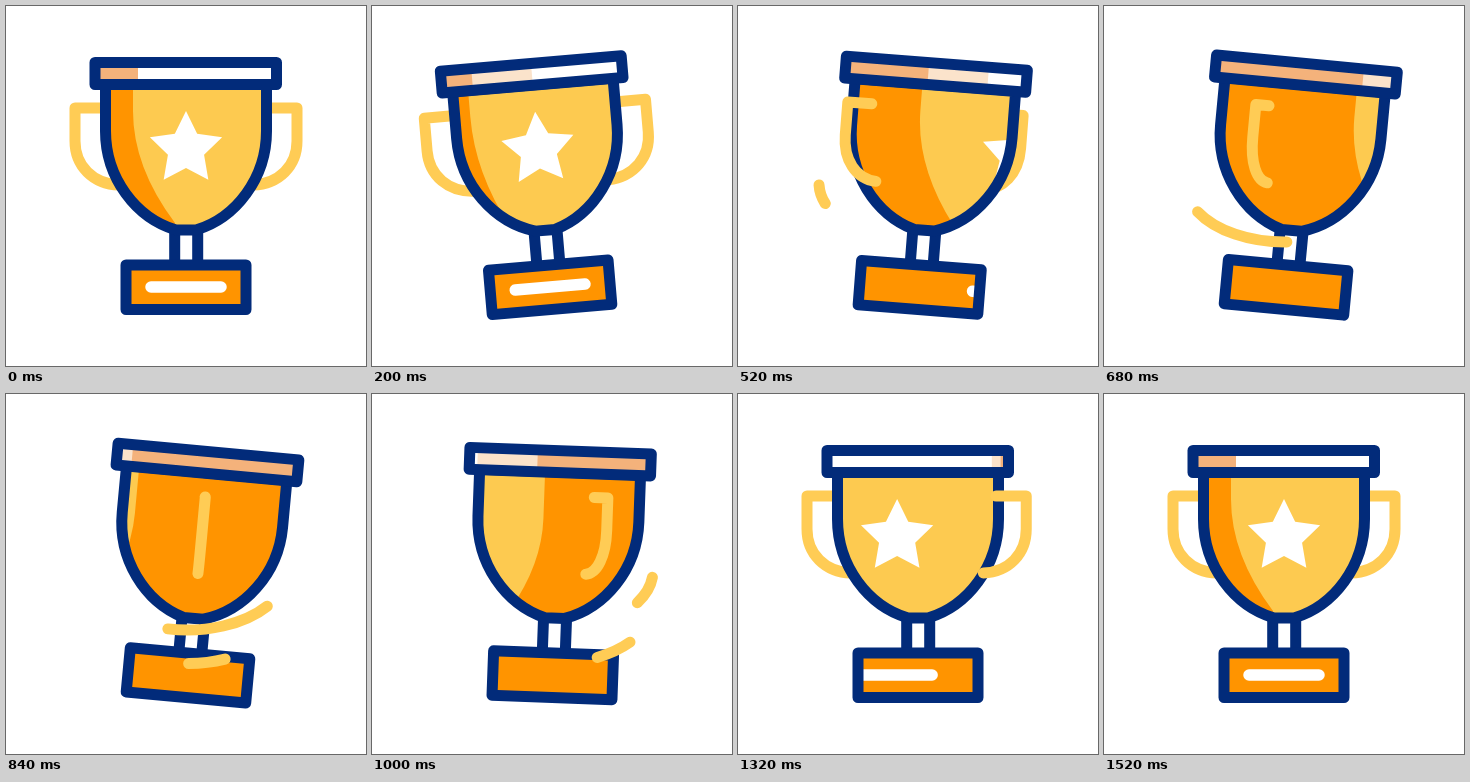
An HTML page that plays this animation: 360x360 px, repeating every 1800 ms.

```html
<!DOCTYPE html>
<html lang="en">
<head>
<meta charset="utf-8">
<title>Spinning trophy</title>
<style>
  html, body { margin: 0; width: 100%; height: 100%; overflow: hidden; background: #fff; }
  svg { display: block; width: 100vw; height: 100vh; }
  .line { fill: none; stroke: #022b7a; stroke-width: 11; stroke-linejoin: round; stroke-linecap: round; }
  .gold { fill: none; stroke: #ffcc55; stroke-width: 11; stroke-linejoin: round; stroke-linecap: round; }
</style>
</head>
<body>
<svg viewBox="0 0 360 360">
  <defs>
    <path id="bowl" d="M99.5 78V125C99.5 172 130 212 170 224H190C230 212 260.5 172 260.5 125V78Z"/>
    <rect id="lip" x="89" y="56.5" width="181.5" height="22"/>
    <rect id="foot" x="120" y="259" width="120" height="44.5"/>
    <clipPath id="inBowl"><use href="#bowl"/></clipPath>
    <clipPath id="inLip"><use href="#lip"/></clipPath>
    <clipPath id="inFoot"><use href="#foot"/></clipPath>
  </defs>
  <g id="trophy">
    <path id="backHandle" class="gold"/>
    <g id="behind"></g>
    <path class="line" d="M168.7 224V259M191.7 224V259"/>
    <g clip-path="url(#inBowl)">
      <rect id="bowlBase" x="90" y="70" width="180" height="160"/>
      <path id="bowlPart"/>
      <path id="star" fill="#fff"/>
    </g>
    <use href="#bowl" class="line"/>
    <g clip-path="url(#inLip)">
      <use href="#lip" fill="#fff"/>
      <path id="lipGlow" fill="#fbe3cb"/>
      <path id="lipShade" fill="#f4b27b"/>
    </g>
    <use href="#lip" class="line"/>
    <g clip-path="url(#inFoot)">
      <use href="#foot" fill="#ff9400"/>
      <path id="bar" d="M145 281H215" stroke="#fff" stroke-width="11.5" stroke-linecap="round"/>
    </g>
    <use href="#foot" class="line"/>
    <g id="front"><path id="handle" class="gold"/></g>
  </g>
  <path id="upperStreak" class="gold"/>
  <path id="lowerStreak" class="gold"/>
</svg>
<script>
const LOOP = 1800, STEP = 40;
const LIGHT = '#fdca50', SHADE = '#ff9400';
const $ = id => document.getElementById(id);
const set = (id, name, value) => $(id).setAttribute(name, value);

// Progress from 0 to 1 between two times: even, and eased at both ends.
const ramp = (t, from, to) => Math.min(1, Math.max(0, (t - from) / (to - from)));
const ease = (t, from, to) => (1 - Math.cos(Math.PI * ramp(t, from, to))) / 2;

const tilt = t => -5.1 * ease(t, 0, 230) + 10.5 * ease(t, 230, 590) - 5.4 * ease(t, 810, 1140);

// Sideways position of a point that swings from -1 to 1 around the cup.
const orbit = (t, from, to) => -Math.cos(Math.PI * ramp(t, from, to));

// The decorations speed up to the right, then slow down from the left.
const slide = t => t < 800
  ? 88 * Math.max(0, (t - 220) / 300) ** 2
  : -58 * Math.max(0, (1500 - t) / 300) ** 2;

function handlePath(k) {
  const x = r => (180 + r * k).toFixed(2);
  return `M${x(80)} 102H${x(111)}V135C${x(111)} 160 ${x(93)} 178 ${x(67)} 179`;
}

// Area left of an edge that is upright down to y and bends below.
function leftOf(x, y, bend) {
  return `M60 60H${x}V${y}Q${x} ${(y + 217) / 2} ${x + bend} 217V235H60Z`;
}

// Arc around the foot whose head runs ahead of its tail.
function streak(id, p, from, to, cy) {
  const at = q => {
    const a = from + (to - from) * q;
    return `${(181 - 100 * Math.cos(a)).toFixed(2)} ${(cy + 59 * Math.sin(a)).toFixed(2)}`;
  };
  const head = 1 - (1 - p) ** 1.7, tail = p ** 1.7;
  set(id, 'd', p > 0 && p < 1 ? `M${at(tail)}A100 59 0 0 0 ${at(head)}` : '');
}

function starPath() {
  const pts = Array.from({ length: 10 }, (_, i) => {
    const r = i % 2 ? 19 : 38, a = i * Math.PI / 5;
    return `${180 + r * Math.sin(a)} ${143 - r * Math.cos(a)}`;
  });
  return `M${pts.join('L')}Z`;
}

function drawHandles(t) {
  const k = orbit(t, 275, 1400);
  const holder = $(Math.abs(k) < 0.99 ? 'front' : 'behind');
  if ($('handle').parentNode !== holder) holder.append($('handle'));
  set('handle', 'd', handlePath(k));
  set('backHandle', 'd', handlePath(-orbit(t, 340, 1240)));
}

// The shaded side leaves to the right, the lit side follows, then shade returns.
function drawShade(t) {
  const dark = t >= 780 && t < 1360;
  const dip = ease(t, 0, 200) - ease(t, 200, 520);
  let edge = 85 + 42 * ease(t, 1340, 1500);
  if (t < 780) edge = 127 - 12 * ease(t, 0, 200) + 52 * (Math.max(0, t - 200) / 320) ** 2;
  else if (dark) edge = 165 + 0.33 * (t - 1000);

  set('bowlBase', 'fill', dark ? SHADE : LIGHT);
  set('bowlPart', 'fill', dark ? LIGHT : SHADE);
  set('bowlPart', 'd', dark ? leftOf(edge, 125, -30) : leftOf(edge, 105, 42 - 12 * dip));

  const lipEdge = edge + (dark ? -8 : 5);
  const glow = 60 * (ease(t, 0, 200) - ease(t, 1200, 1360));
  set('lipGlow', 'd', `M${lipEdge - glow} 50h${2 * glow}v35h${-2 * glow}Z`);
  set('lipShade', 'd', `M${lipEdge} 50H${dark ? 300 : 60}V85H${lipEdge}Z`);
}

function draw(t) {
  set('trophy', 'transform', `rotate(${tilt(t)} 180 303)`);
  drawHandles(t);
  drawShade(t);
  for (const id of ['star', 'bar']) set(id, 'transform', `translate(${slide(t)} 0)`);
  streak('upperStreak', ramp(t, 480, 1060), 0, 3.1, 177);
  streak('lowerStreak', ramp(t, 720, 1150), 1.45, 2.65, 210.5);
}

set('star', 'd', starPath());
const start = performance.now();
function tick() {
  const t = (performance.now() - start) % LOOP;
  draw(Math.floor(t / STEP) * STEP);
  requestAnimationFrame(tick);
}
tick();
</script>
</body>
</html>
```
